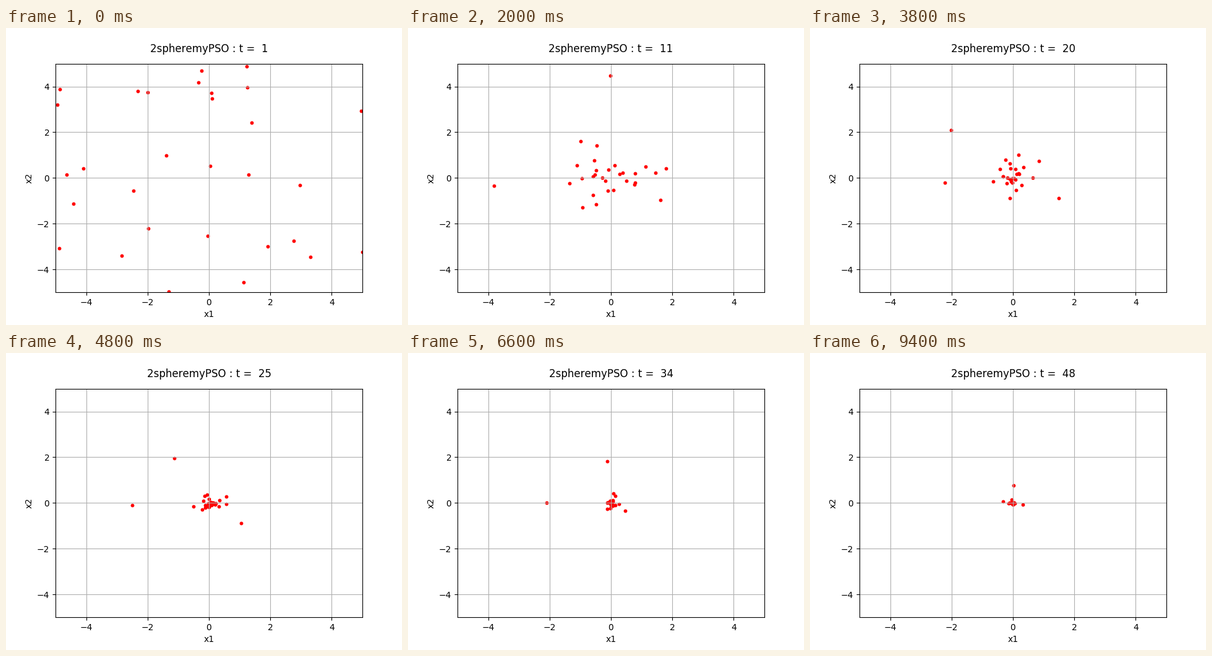
These frames come from a looping animation (640x480 px, 9600 ms). A matplotlib script:

```python
import numpy as np
import matplotlib.pyplot as plt
from matplotlib.animation import FuncAnimation

STEPS = 48
COUNT = 30
BOUND = 5

# Three stragglers keep to a path through a few points; the rest follow a rule.
KEY_STEPS = [1, 5, 11, 20, 30, 39, 48]
STRAGGLERS = [
    [(-4.85, 3.88), (-3.77, 0.63), (-3.81, -0.35), (-2.22, -0.2),
     (-2.78, 0), (-1.25, 0), (-0.33, 0.06)],
    [(-0.25, 4.69), (1.48, 3.39), (-0.03, 4.47), (-2.02, 2.1),
     (-0.24, 1.82), (0.05, 1.8), (0.02, 0.77)],
    [(5, -3.24), (3.5, -3.32), (1.62, -0.95), (1.5, -0.88),
     (0.6, -0.86), (0.3, 0.3), (0.33, -0.06)],
]


def straggler_path(points):
    """Walk straight from point to point."""
    steps = np.arange(1, STEPS + 1)
    return np.column_stack([np.interp(steps, KEY_STEPS, axis)
                            for axis in zip(*points)])


def swarm_paths(count, rng):
    """Swing each particle around the optimum, damped at its own pace."""
    age = np.arange(STEPS)[:, None, None]
    start = rng.uniform(-BOUND, BOUND, (count, 2))
    fade = np.exp(-age / rng.uniform(6, 15, (count, 1)))
    rate = rng.uniform(0.15, 0.9, (count, 2))
    shake = rng.normal(0, 0.6, (STEPS, count, 2)) * np.minimum(1, age / 5)
    return fade * (start * np.cos(rate * age) + shake)


stragglers = np.stack([straggler_path(p) for p in STRAGGLERS], axis=1)
swarm = swarm_paths(COUNT - len(STRAGGLERS), np.random.default_rng(7))
paths = np.concatenate([stragglers, swarm], axis=1)

# Whole-pixel letter spacing
plt.rcParams["text.kerning_factor"] = 6

fig, ax = plt.subplots(figsize=(6.4, 4.8), dpi=100)
ax.set(xlim=(-BOUND, BOUND), ylim=(-BOUND, BOUND), xlabel="x1", ylabel="x2")
ax.set_xticks(range(-4, 5, 2))
ax.set_yticks(range(-4, 5, 2))
ax.grid(True)
dots = ax.scatter(*paths[0].T, s=10, c="red")
title = ax.text(0.5, 1.05, "", ha="center", fontsize=12,
                transform=ax.transAxes)


def draw(frame):
    dots.set_offsets(paths[frame])
    title.set_text(f"2spheremyPSO : t =  {frame + 1}")
    return dots, title


anim = FuncAnimation(fig, draw, frames=STEPS, interval=200, repeat=True,
                     repeat_delay=0)
plt.show()
```
